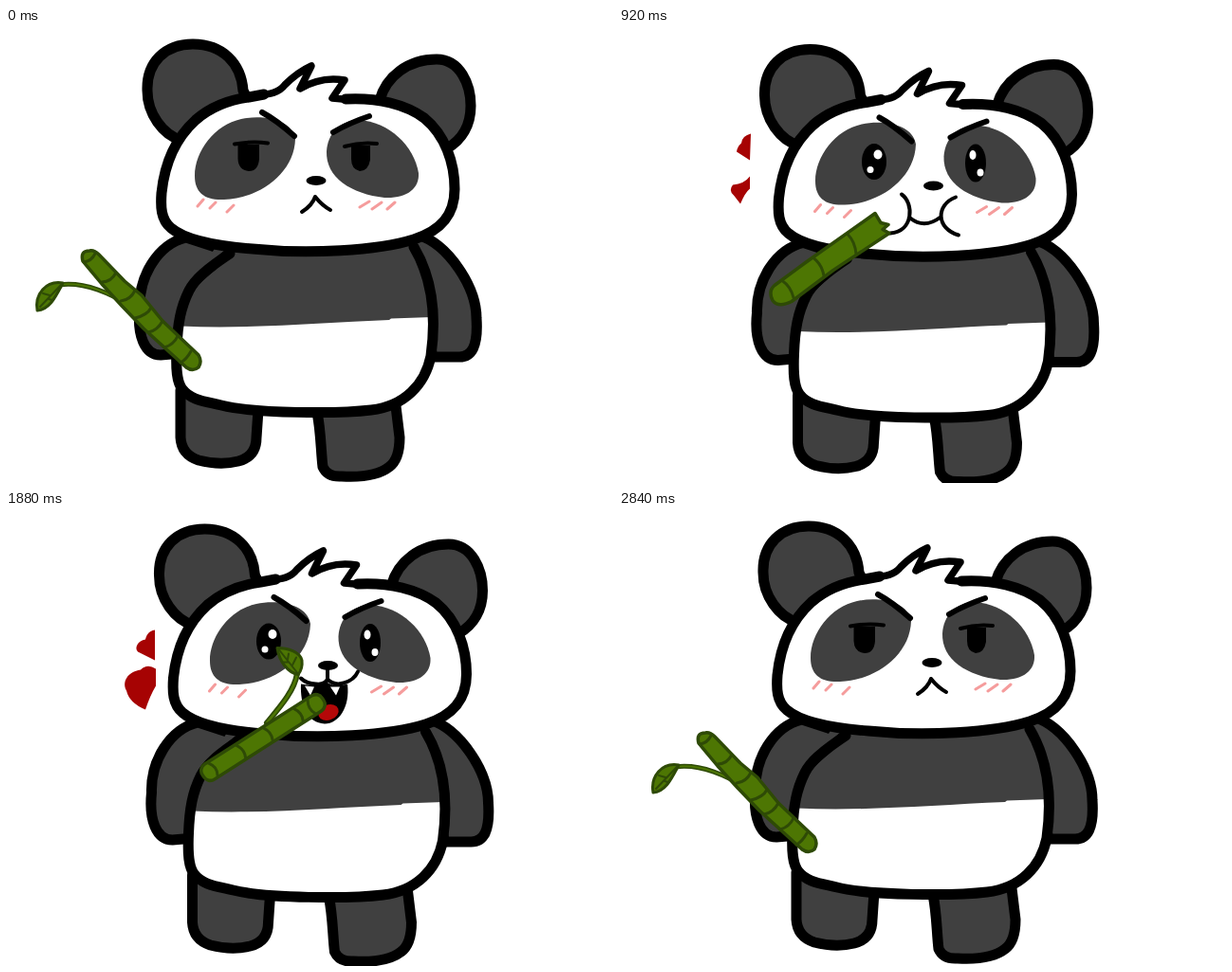
Write an HTML page that moves like this. It is 640 by 480 pixels and loops after 2.88 s.

```html
<!DOCTYPE html>
<html lang="en">
<head>
<meta charset="utf-8">
<title>Hungry panda</title>
<style>
html, body { margin: 0; width: 100%; height: 100%; overflow: hidden; background: #fff; }
svg { display: block; width: 100vw; height: 100vh; }
.ink { fill: none; stroke: #000; stroke-width: 4; stroke-linecap: round; stroke-linejoin: round; }
.thick { stroke-width: 11; }
.limb { fill: #404040; stroke: #000; stroke-width: 11; stroke-linecap: round; stroke-linejoin: round; }
.patch { fill: #404040; }
.stalk { fill: #4d7603; stroke: #2e4a06; stroke-width: 3.5; stroke-linejoin: round; stroke-linecap: round; }
.vein { fill: none; stroke: #2e4a06; stroke-width: 3; stroke-linecap: round; }
.heart { fill: #a60303; }
.blush { fill: none; stroke: #f59c9c; stroke-width: 3; stroke-linecap: round; }
.pose { display: none; }
</style>
</head>
<body>
<svg viewBox="0 0 640 480" preserveAspectRatio="none">
  <defs>
    <g id="bamboo">
      <path class="vein" style="stroke-width:6" d="M176 256C191 238 205 222 208 204"/>
      <path d="M176 256C191 238 205 222 208 204" fill="none" stroke="#4d7603" stroke-width="2.5"/>
      <path class="stalk" style="stroke-width:3" d="M187 177C198 177 211 181 213 190Q214 199 209 205C198 203 189 191 187 177Z"/>
      <path class="vein" style="stroke-width:2" d="M189 179L208 203M198 189L199 183M203 195L207 187M199 192L193 192"/>
      <g transform="translate(172 271.500) rotate(-32.600)">
        <rect class="stalk" x="-75" y="-9.500" width="150" height="19" rx="8"/>
        <path class="vein" d="M-63 -8Q-57 0 -62 8M-28 -8Q-23 0 -27 8M6 -8Q11 0 7 8M44 -8Q49 0 45 8M61 -8Q56 0 60 8"/>
      </g>
    </g>
    <g id="bigHearts" class="heart">
      <path d="M148 130C141 131 139 136 138 140C130 141 126 149 130 153L148 162Z"/>
      <path d="M149 171Q140 165 133 172C119 174 113 185 118 194Q121 207 138 214Q143 199 149 189Z"/>
    </g>
    <g id="brightEyes">
      <ellipse cx="264.500" cy="135.500" rx="13" ry="19"/>
      <ellipse cx="371.500" cy="137" rx="11" ry="20"/>
      <g fill="#fff">
        <ellipse cx="268.500" cy="128" rx="4.500" ry="5"/><circle cx="260.500" cy="144" r="3.500"/>
        <ellipse cx="368.500" cy="128.500" rx="3.500" ry="5"/><ellipse cx="376.500" cy="147" rx="3.500" ry="4"/>
      </g>
    </g>
  </defs>
  <g id="panda">
    <path class="limb" d="M184 382L184 432Q185 450 203 456Q226 462 245 457Q264 452 264 432L266 403"/>
    <path class="limb" d="M328 406C332 424 332 447 334 463Q339 474 354 473Q389 475 404 463Q415 455 415 432L411 399"/>
    <path class="limb" d="M190 221C160 228 140 262 141 295C138 324 146 345 163 345L186 343L236 236Z"/>
    <path class="limb" d="M434 218C467 228 496 274 496 306C498 336 491 347 478 347L450 347L425 236Z"/>
    <path class="patch" d="M230 215C205 262 184 274 180 340L449 340C456 290 450 252 434 215Z"/>
    <path fill="#fff" d="M184 314.500C255 318 330 311 404 308L406 306.500L449 305L448 350C440 380 430 400 395 402L260 402C200 395 182 385 180 360Z"/>
    <path class="ink thick" d="M236 238C212 254 199 265 193 277C184 295 181 312 180 338C179 360 180 374 186 381C195 393 211 394 227 398C262 407 352 407 385 403C420 399 442 376 448 346C453 310 452 268 430 231"/>
    <path class="ink" style="stroke-width:9" d="M233 238L197 270"/>
    <path class="limb" d="M186 119C165 113 149 90 149 66C148 36 168 17 197 17C228 17 248 37 250 66L256 78Z"/>
    <path class="limb" d="M394 76C401 51 424 33 454 33C479 33 490 60 490 82C490 102 481 118 465 127Z"/>
    <path fill="#fff" d="M256 73L290 65L322 40L310 63L356 55L344 74C392 72 422 81 441 95C463 113 473 142 473 170C473 198 458 214 430 223C392 235 318 239 260 233C220 230 188 223 174 211C163 202 163 188 164 174C167 145 178 117 200 97C215 84 234 76 256 73Z"/>
    <path class="ink thick" d="M358 75C392 73 422 81 441 95C463 113 473 142 473 170C473 198 458 214 430 223C392 235 318 239 260 233C220 230 188 223 174 211C163 202 163 188 164 174C167 145 178 117 200 97C215 84 234 76 256 73L272 70"/>
    <path class="ink" style="stroke-width:7.500" d="M264 71C279 70 288 68 294 60C303 51 311 45 322 40L310 64C325 55 340 52 357 55L344 74L366 76"/>
    <path id="patchL" class="patch" d="M305 117C302 96 270 91 248 96C220 102 199 130 199 156C199 174 210 182 230 181C266 180 304 154 305 117Z"/>
    <path id="patchR" class="patch" d="M338 130C339 112 352 97 372 97C404 99 430 124 435 153C436 170 422 180 399 179C364 175 337 158 338 130Z"/>
    <path class="ink" style="stroke-width:6" d="M270 89Q285 97 304 114M345 110Q362 100 383 93"/>
    <path class="blush" d="M208 181L202 188M221 184L215 190M240 187L233 194M383 183L373 189M396 184L386 191M410 184L402 191"/>
    <ellipse cx="327" cy="161" rx="10.500" ry="5"/>

    <g class="pose" id="grumpy">
      <path class="ink" d="M241 122.500Q260 119 276 121.500M357 125Q374 120 391 122"/>
      <path d="M244.500 123H267V138Q266 151 256 151Q245 150 244.500 138ZM364 124H384V139Q382 151 373 151Q364 149 364 138Z"/>
      <path class="ink" d="M312 194Q323 187 326 178Q333 187 342 192"/>
      <path class="vein" style="stroke-width:5" d="M134 294C111 281 84 267 56 271"/>
      <path d="M134 294C111 281 84 267 56 271" fill="none" stroke="#4d7603" stroke-width="2"/>
      <path class="stalk" style="stroke-width:3" d="M60 269C42 266 30 281 33 298C46 297 52 284 60 269Z"/>
      <path class="vein" style="stroke-width:2" d="M58 271L36 294M46 282L39 280M45 286L49 287"/>
      <path class="stalk" d="M81 246Q78 235 88 235Q93 234 98 239L125 267L143 282L165 309L203 345Q207 352 203 358Q197 363 190 358L145 317L122 293L101 270Z"/>
      <path class="vein" d="M82 247Q90 246 94 238M101 268Q111 268 116 258M121 288Q131 287 136 277M136 306Q149 303 153 295M150 321Q160 319 165 309M167 337Q177 334 181 325M184 353Q190 350 195 341"/>
    </g>

    <g class="pose" id="happy">
      <use href="#brightEyes"/>
      <g transform="translate(-1.500 -8)">
        <path class="ink" d="M328 173V183Q325 192 313 191Q303 190 296 184M328 183Q334 191 343 188Q355 185 359 177"/>
        <path d="M301 189Q315 195 328 185Q334 192 341 190C340 204 333 213 320 213C308 213 300 203 301 189Z"/>
        <ellipse cx="320" cy="204" rx="12" ry="5.500" fill="#b40808"/>
        <path fill="#fff" d="M304 192L312 193L307 198ZM332 191L339 191L336 196Z"/>
        <path class="heart" d="M136 116L135 140L121 131Q119 126 127 125Q129 117 136 116ZM134 162L125 166Q123 173 114 174Q113 179 118 180L124 189Q128 177 134 171Z"/>
        <use href="#bamboo"/>
      </g>
    </g>

    <g class="pose" id="bite">
      <use href="#brightEyes"/>
      <g transform="translate(-3.500 -6.500)">
        <path class="ink" d="M330 171V182Q327 188 318 187Q308 187 302 181M330 182Q337 189 347 186Q358 183 362 174"/>
        <path d="M302 187Q316 190 329 185Q338 191 351 187C354 211 342 229 327 229C309 228 301 210 302 187Z"/>
        <path fill="#fff" d="M306 189L316 190L312 199ZM333 190L343 190L339 199Z"/>
        <ellipse cx="331" cy="217" rx="11" ry="8" fill="#b40808" transform="rotate(-20 331 217)"/>
        <use href="#bigHearts"/>
        <use href="#bamboo" x="90" y="-28"/>
      </g>
    </g>

    <g class="pose" id="chew">
      <use href="#brightEyes"/>
      <g transform="translate(-10.500 -1)">
        <path class="ink" d="M304 171C317 180 317 210 292 212M313 196Q328 208 345 195M361 174C340 182 340 207 364 214"/>
        <path class="heart" d="M145 107L144 135L130 126Q131 120 135 117Q136 109 145 107ZM144 152Q138 160 126 161Q121 167 127 172L134 181Q139 169 144 165Z"/>
        <path class="stalk" d="M170 267L204 242L276 191L282 201L290 203L284 208L291 212L232 251L188 284Q174 291 168 283Q163 273 170 267Z"/>
        <path class="vein" d="M178 262Q187 268 190 280M211 238Q220 245 222 257M247 213Q255 221 256 234"/>
      </g>
    </g>

    <g class="pose" id="squint">
      <g transform="translate(-6 -5)">
        <path class="ink" style="stroke-width:3.500" d="M266 133L292 146Q277 150 265 157M396 133L371 146L398 162"/>
        <path class="ink" d="M301 181C306 197 304 208 294 210M304 197Q324 209 343 198M354 185C341 193 343 208 351 214"/>
        <use href="#bigHearts" x="2.500" y="-2"/>
      </g>
    </g>
  </g>
</svg>
<script>
const LOOP = 2880;
// start time, pose, x shift, y shift
const steps = [
  [0, "grumpy", 0, 0],
  [280, "happy", 1.5, 8],
  [600, "bite", 3.5, 6.5],
  [920, "chew", 4.5, 5.5],
  [1240, "squint", 6, 5],
  [1560, "happy", 13, 2.5],
  [1880, "bite", 12.5, 2],
  [2200, "chew", 10.5, 1],
  [2520, "squint", 2.5, -0.5],
  [2840, "grumpy", 3, -1]
];
const get = id => document.getElementById(id);
const poses = [...document.querySelectorAll(".pose")];
const shift = (id, x, y) => get(id).setAttribute("transform", `translate(${x} ${y})`);
let shown = null;

function show(step) {
  const [, name, x, y] = step;
  for (const pose of poses) pose.style.display = pose.id === name ? "inline" : "none";
  const calm = name === "grumpy";
  shift("panda", x, y);
  shift("patchL", calm ? 0 : 3.5, 0);
}

const start = performance.now();
function draw(now) {
  const t = Math.max(0, now - start) % LOOP;
  const step = steps.findLast(s => s[0] <= t);
  if (step !== shown) show(shown = step);
  requestAnimationFrame(draw);
}
draw(start);
</script>
</body>
</html>
```
